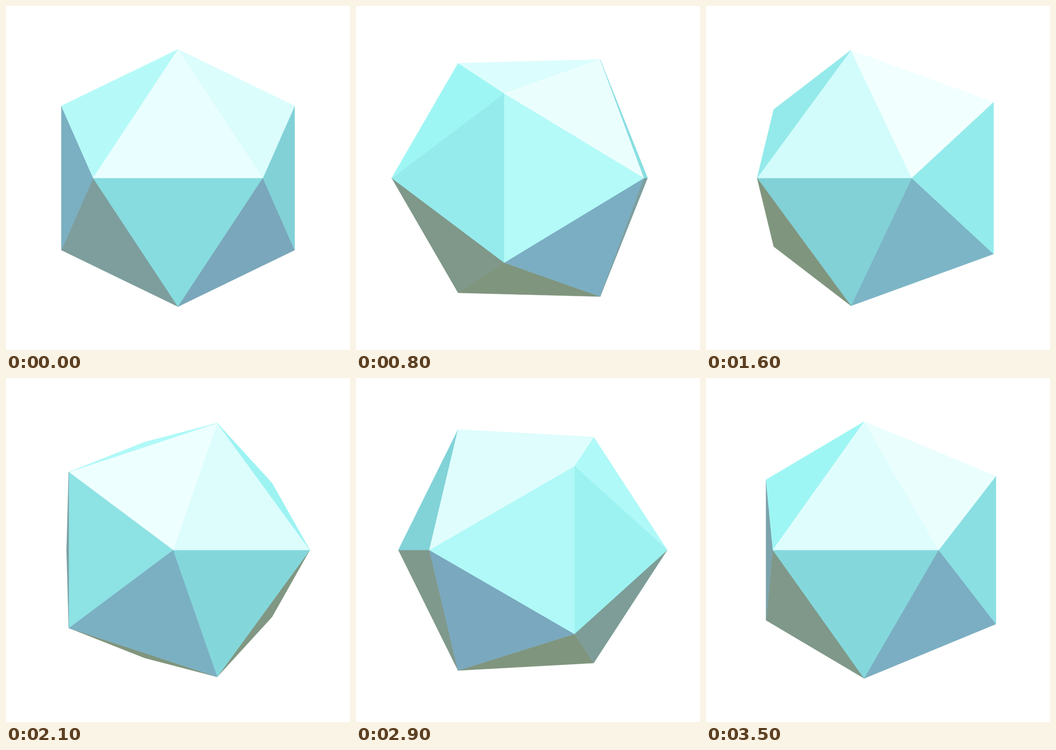
Recreate the animation shown at these times as an HTML page with a canvas. Size 748 by 748 pixels, loop 3600 ms.

```html
<!DOCTYPE html>
<html>
<head>
<meta charset="utf-8">
<title>Icosahedron</title>
<style>
html, body { margin: 0; width: 100%; height: 100%; overflow: hidden; background: #fff; }
canvas { display: block; }
</style>
</head>
<body>
<canvas id="stage" width="748" height="748"></canvas>
<script>
const ctx = document.getElementById('stage').getContext('2d');
const PHI = (1 + Math.sqrt(5)) / 2;
const CENTER = 374, FOCAL = 1687, DISTANCE = 10.76;
const STEP = 100, STEPS = 36;
const LIGHT = [0.1, 0.6, 0.65];

// Olive shadow, blue, teal, cyan and near white, evenly spaced over the light.
const TONES = [[128, 149, 126], [122, 168, 190], [130, 214, 218], [160, 248, 246], [242, 255, 255]];
const DARKEST = -0.15, BRIGHTEST = 0.85;

const dot = (a, b) => a[0] * b[0] + a[1] * b[1] + a[2] * b[2];
const sub = (a, b) => a.map((v, i) => v - b[i]);
const add = (a, b) => a.map((v, i) => v + b[i]);

const vertices = [];
for (const a of [-1, 1]) {
  for (const b of [-PHI, PHI]) {
    vertices.push([0, b, a], [a, 0, b], [b, a, 0]);
  }
}

// Any three vertices that lie one edge apart form a face.
const touching = (a, b) => {
  const d = sub(vertices[a], vertices[b]);
  return Math.abs(dot(d, d) - 4) < 0.01;
};
const faces = [];
for (let i = 0; i < 12; i++)
  for (let j = i + 1; j < 12; j++)
    for (let k = j + 1; k < 12; k++)
      if (touching(i, j) && touching(j, k) && touching(i, k)) faces.push([i, j, k]);

function shade(light) {
  const level = Math.max(0, Math.min(1, (light - DARKEST) / (BRIGHTEST - DARKEST)));
  const place = level * (TONES.length - 1);
  const i = Math.min(TONES.length - 2, Math.floor(place));
  const rgb = TONES[i].map((v, c) => Math.round(v + (TONES[i + 1][c] - v) * (place - i)));
  return `rgb(${rgb})`;
}

function project([x, y, z]) {
  const scale = FOCAL / (DISTANCE - z);
  return [CENTER + x * scale, CENTER - y * scale];
}

function draw(angle) {
  const s = Math.sin(angle), c = Math.cos(angle);
  const turned = vertices.map(([x, y, z]) => [x * c + z * s, y, z * c - x * s]);

  ctx.fillStyle = '#fff';
  ctx.fillRect(0, 0, 748, 748);
  ctx.lineWidth = 0.6;
  ctx.lineJoin = 'round';

  for (const face of faces) {
    const points = face.map(i => turned[i]);
    const sum = points.reduce(add);
    const normal = sum.map(v => v / Math.hypot(...sum));
    if (dot(normal, sub([0, 0, DISTANCE], points[0])) <= 0) continue;

    ctx.fillStyle = ctx.strokeStyle = shade(dot(normal, LIGHT));
    ctx.beginPath();
    points.forEach(p => ctx.lineTo(...project(p)));
    ctx.closePath();
    ctx.fill();
    ctx.stroke();
  }
}

const start = performance.now();
function tick() {
  const step = Math.floor((performance.now() - start) / STEP) % STEPS;
  draw(step / STEPS * 2 * Math.PI);
  requestAnimationFrame(tick);
}
tick();
</script>
</body>
</html>
```
